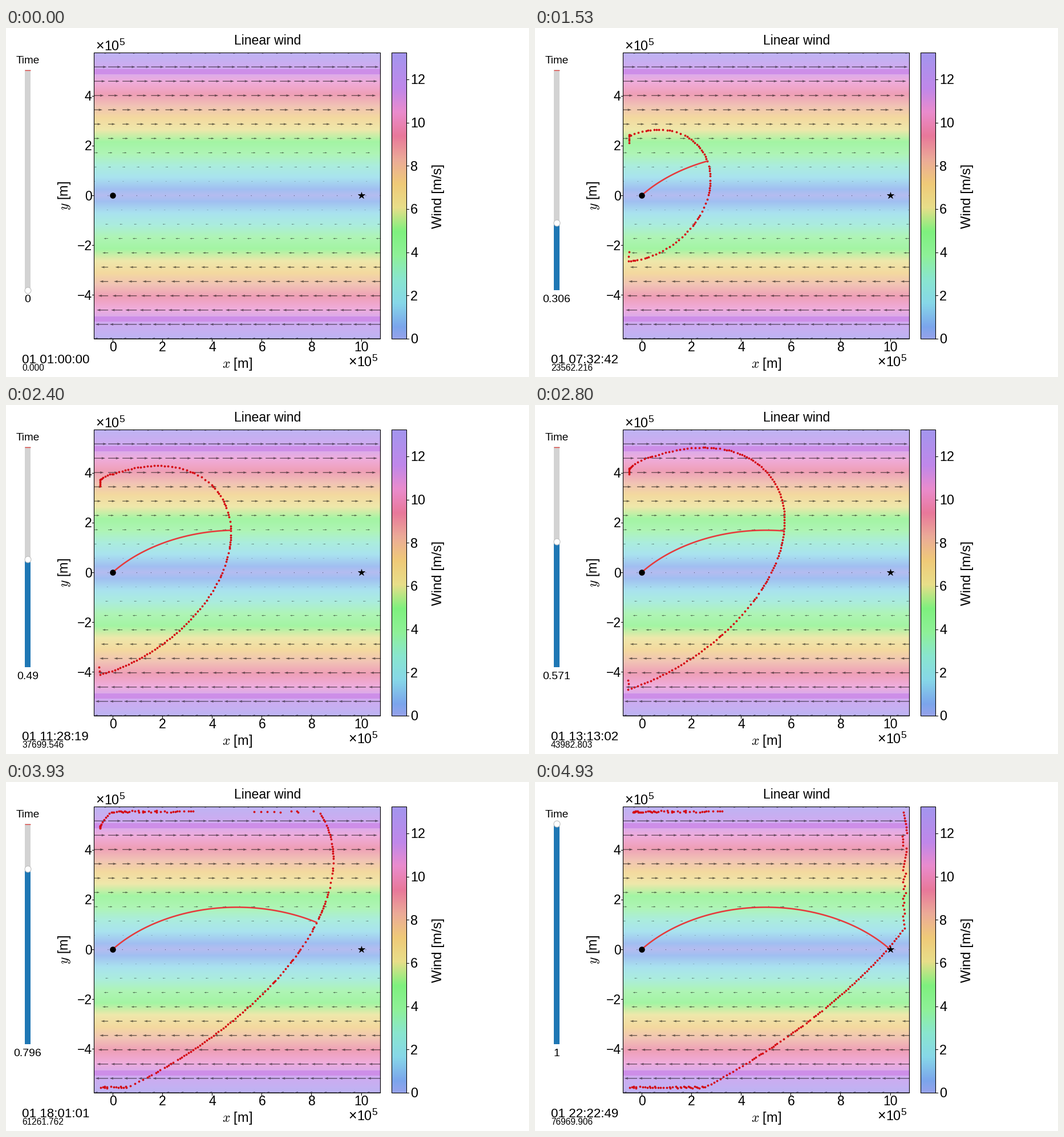
Recreate the animation shown at these times as a matplotlib script. Size 917 px wide and 611 px high, loop 5060 ms.

```python
import numpy as np
import matplotlib.pyplot as plt
from matplotlib.animation import FuncAnimation
from matplotlib.patches import Rectangle

W, H, DPI = 917, 611, 100
LOOP_MS, INTERVAL = 5060, 20
STEPS = 49
DURATION = 76969.906
PT = 72 / DPI
LEFT, RIGHT, TOP, BOTTOM = 154, 656, 43, 544
X0, Y0, PX_PER_M = 187, 293, 435.5e-6
MAX_WIND = 13.24

plt.rcParams["font.family"] = "Liberation Sans"
plt.rcParams["mathtext.fontset"] = "cm"

fig = plt.figure(figsize=(W / DPI, H / DPI), dpi=DPI, facecolor="white")
ax = fig.add_axes([0, 0, 1, 1])
ax.axis("off")


def label(x, y, text, px, ha="left", **kw):
    return ax.text(x, y, text, fontsize=px * PT, ha=ha,
                   va=kw.pop("va", "baseline"), zorder=9, **kw)


def segment(x, y, **kw):
    ax.plot(x, y, **{"color": "black", "lw": 0.8, **kw})


def frame_box(left, right):
    box = Rectangle((left, TOP), right - left, BOTTOM - TOP, fill=False, lw=0.8, zorder=7)
    return ax.add_patch(box)


# --- wind colours ------------------------------------------------------
STOPS = [0, 1, 3, 5, 7, 9, 11, 13, 15, 17, 19, 21, 24]
COLORS = np.array([
    (131, 144, 231), (98, 148, 232), (112, 208, 228), (115, 225, 198),
    (121, 238, 132), (102, 238, 102), (228, 216, 115), (236, 192, 95),
    (232, 155, 132), (228, 95, 135), (230, 118, 195), (180, 113, 230),
    (145, 130, 235)]) / 255


def wind_color(level, alpha):
    """Colour over white for wind levels in 0..1."""
    rgb = np.stack([np.interp(level * 24, STOPS, c) for c in COLORS.T], axis=-1)
    return 1 - alpha * (1 - rgb)


def show_strip(rgb, left, right):
    ax.imshow(rgb[:, None, :], extent=(left, right, BOTTOM, TOP), aspect="auto",
              interpolation="nearest", origin="upper", zorder=0)


rows = np.arange(TOP, BOTTOM) + 0.5
offset = np.abs(rows - Y0)
field = wind_color(offset / 250.5, 0.6)
field[(offset > 212) & (offset < 221.5)] = np.array((205, 142, 232)) / 255
show_strip(field, LEFT, RIGHT)
show_strip(wind_color((BOTTOM - rows) / (BOTTOM - TOP), 0.84), 676, 702)

plot_box = frame_box(LEFT, RIGHT)
frame_box(676, 701.6)

grid = np.linspace(-1, 1, 21)
qx, qy = np.meshgrid(LEFT + (grid + 1) * (RIGHT - LEFT) / 2, Y0 + 0.5 - grid * 250.4)
arrow_len = np.repeat(grid[:, None] * 25.2, 21, axis=1)
arrows = ax.quiver(qx, qy, arrow_len, np.zeros_like(arrow_len), units="dots",
                   scale_units="dots", scale=1, width=1.35, minshaft=2,
                   color="black", alpha=0.57, zorder=2)
arrows.set_clip_path(plot_box)

# --- axis labels -------------------------------------------------------
for value in range(0, 11, 2):
    x = X0 + value * 1e5 * PX_PER_M
    segment([x, x], [BOTTOM, BOTTOM + 3.5])
    label(x + 0.5, 566, str(value), 23, "center")
for value in range(-4, 5, 2):
    y = Y0 - value * 1e5 * PX_PER_M
    segment([LEFT - 3.5, LEFT], [y, y])
    label(150.5, y + 8.5, str(value).replace("-", "\u2212"), 23, "right")
for value in range(0, 13, 2):
    y = BOTTOM - value * (BOTTOM - TOP) / MAX_WIND
    segment([702, 705.5], [y, y])
    label(709, y + 8.5, str(value), 23.5)
for x, y in ((157, 39), (600, 592)):
    label(x, y, "\u00d7", 25)
    label(x + 15, y, "10", 23.5)
    label(x + 41.5, y - 9, "5", 17.5)

label(459, 29, "Linear wind", 23, "center")
label(405.5, 595, "$x$ [m]", 23.5, "center")
label(103, 293, "$y$ [m]", 23.5, "center", va="center", rotation=90)
label(758, 294, "Wind [m/s]", 24, "center", va="center", rotation=90)

# --- slider and clock --------------------------------------------------
SLIDER_TOP, SLIDER_BOTTOM = 73, 458.5
ax.add_patch(Rectangle((33, SLIDER_TOP), 10, SLIDER_BOTTOM - SLIDER_TOP,
                       fc="lightgray", lw=0))
segment([33, 43], [73.5, 73.5], color="#e8413c", lw=0.9, solid_capstyle="butt")
slider_bar = ax.add_patch(Rectangle((33, SLIDER_BOTTOM), 10, 0, fc="#1f77b4", lw=0, zorder=4))
handle, = ax.plot([], [], "o", ms=11 * PT, mfc="white", mec="0.75", mew=0.8, zorder=6)
label(38, 62, "Time", 19, "center")
slider_text = label(38, 480, "", 19.5, "center")
clock_text = label(28, 587, "", 22.4)
seconds_text = label(28, 600, "", 15.5)

# --- optimal path, in units of airspeed / shear ------------------------
SHEAR_TIME = 1.77
S0 = SHEAR_TIME / 2
SEC0 = np.hypot(1, S0)
UNIT = 1e6 / (np.arcsinh(S0) + S0 * SEC0)
UNIT_PX = UNIT * PX_PER_M


def path(tau_end):
    tau = np.linspace(0, tau_end, 120)
    s = S0 - tau
    sec = np.hypot(1, s)
    x = (np.arcsinh(S0) - np.arcsinh(s) - S0 * SEC0 + s * sec) / 2 + SEC0 * tau
    return X0 + UNIT_PX * x, Y0 - UNIT_PX * (SEC0 - sec)


# --- front of extremals ------------------------------------------------
COARSE = 32
HEADINGS, SLIDERS = 48 * COARSE, 16 * COARSE
N = HEADINGS + SLIDERS
SUB = 2
DT = SHEAR_TIME / STEPS / SUB
LAG = 1 / SUB
WALL_X = -4.95e4 / UNIT
SLIDE_START, SLIDE_END = 0.47, 1.45

# Some extremals climb the left edge, holding x against the wind, until released.
release = np.concatenate([np.zeros(HEADINGS), np.linspace(SLIDE_START, SLIDE_END, SLIDERS)])


def wall_y(tau):
    return np.sin(tau - 0.02)


def velocity(state):
    _, y, theta = state
    return np.array([np.cos(theta) + y, np.sin(theta), -np.cos(theta) ** 2])


def shoot_extremals():
    """Pixel positions per step and the step at which each one leaves the domain."""
    state = np.zeros((3, N))
    state[2, :HEADINGS] = np.linspace(-np.pi, np.pi, HEADINGS)
    left_at = np.full(N, np.inf)
    history = [state]
    for i in range(1, STEPS * SUB + 1):
        moved = state + DT * velocity(state + DT / 2 * velocity(state))
        y = wall_y(i * DT)
        moved[:, release > i * DT] = np.array([[WALL_X], [y], [np.arccos(-y)]])
        state = np.where(np.isinf(left_at), moved, state)
        x, y = state[:2] * UNIT
        outside = (x < -5e4) | (x > 1.05e6) | (np.abs(y) > 5.5e5)
        left_at[outside & np.isinf(left_at)] = i / SUB
        history.append(state)
    sampled = [history[max(step * SUB - 1, 0)] for step in range(STEPS + 1)]
    px = np.array(sampled)[:, :2] * UNIT_PX
    return X0 + px[:, 0], Y0 - px[:, 1], left_at


def birth_steps(px, py, left_at):
    """Insert a new extremal between two neighbours once they drift apart."""
    rng = np.random.default_rng(4)
    born = np.full(N, STEPS + 1)
    born[::COARSE] = 0
    steps = np.arange(STEPS + 1)[:, None]
    gap = COARSE
    while gap > 1:
        a = np.arange(0, N, gap)
        b, mid = np.minimum(a + gap, N - 1), a + gap // 2
        distance = np.hypot(px[:, a] - px[:, b], py[:, a] - py[:, b])
        alive = steps < np.maximum(left_at[a], left_at[b])
        wide = alive & (distance > rng.uniform(6.5, 9.5, a.size))
        first = np.where(wide.any(0), wide.argmax(0), STEPS + 1)
        born[mid] = np.maximum(first, np.maximum(born[a], born[b]))
        gap //= 2
    return born


def rest_time(x, y):
    """Steps for which a stopped extremal stays on show at its exit point."""
    on_left = x < 166
    far_side = (x > 640) | ((y < 57) & (x > 328))
    return np.select([on_left & (y > Y0), on_left, far_side], [3, 2, 6], 99)


front_x, front_y, left_at = shoot_extremals()
born = birth_steps(front_x, front_y, left_at)
gone_at = left_at + rest_time(front_x[-1], front_y[-1])

front, = ax.plot([], [], "o", ms=3.8 * PT, color="#d40a12", mew=0, zorder=4)
track, = ax.plot([], [], color="#e63a3c", lw=2.6 * PT, zorder=5)
ax.plot(X0, Y0, "o", ms=10.5 * PT, color="black", mew=0, zorder=8)
ax.plot(X0 + 1e6 * PX_PER_M, Y0, "*", ms=13 * PT, color="black", mew=0.5, zorder=8)

ax.set_xlim(0, W)
ax.set_ylim(H, 0)


def wall_trail(tau):
    """Dots just left behind on the left edge."""
    if not SLIDE_START < tau < SLIDE_END:
        return [], []
    y = wall_y(tau - np.linspace(0, 2 * SUB * DT, 5))
    return np.full(5, X0 + WALL_X * UNIT_PX), Y0 - y * UNIT_PX


def short_number(value):
    digits = next(d for d in range(4) if abs(value - round(value, d)) < 1e-3)
    return f"{value:.{digits}f}"


def step_at(ms):
    # odd steps start 30 ms late
    step, rest = divmod(ms, 100)
    if step % 2 and rest < 30:
        step -= 1
    return min(step, STEPS)


def update(n):
    step = step_at(n * INTERVAL + INTERVAL // 2)
    progress = step / STEPS

    level = SLIDER_BOTTOM - progress * (SLIDER_BOTTOM - SLIDER_TOP)
    slider_bar.set_y(level)
    slider_bar.set_height(SLIDER_BOTTOM - level)
    handle.set_data([38], [level + 0.3])
    slider_text.set_text(short_number(progress))

    elapsed = DURATION * progress
    total = int(elapsed) + 3600
    clock_text.set_text(f"01 {total // 3600:02d}:{total // 60 % 60:02d}:{total % 60:02d}")
    seconds_text.set_text(f"{elapsed:.3f}")

    # the drawn state trails the clock by one integration step
    now = max(step - LAG, 0)
    tau = now / STEPS * SHEAR_TIME
    track.set_data(*path(tau))
    shown = (born <= step) & (release <= tau) & (now < gone_at)
    trail_x, trail_y = wall_trail(tau)
    front.set_data(np.append(front_x[step, shown], trail_x),
                   np.append(front_y[step, shown], trail_y))
    return slider_bar, handle, slider_text, clock_text, seconds_text, track, front


anim = FuncAnimation(fig, update, frames=LOOP_MS // INTERVAL, interval=INTERVAL, repeat=True)
plt.show()
```
